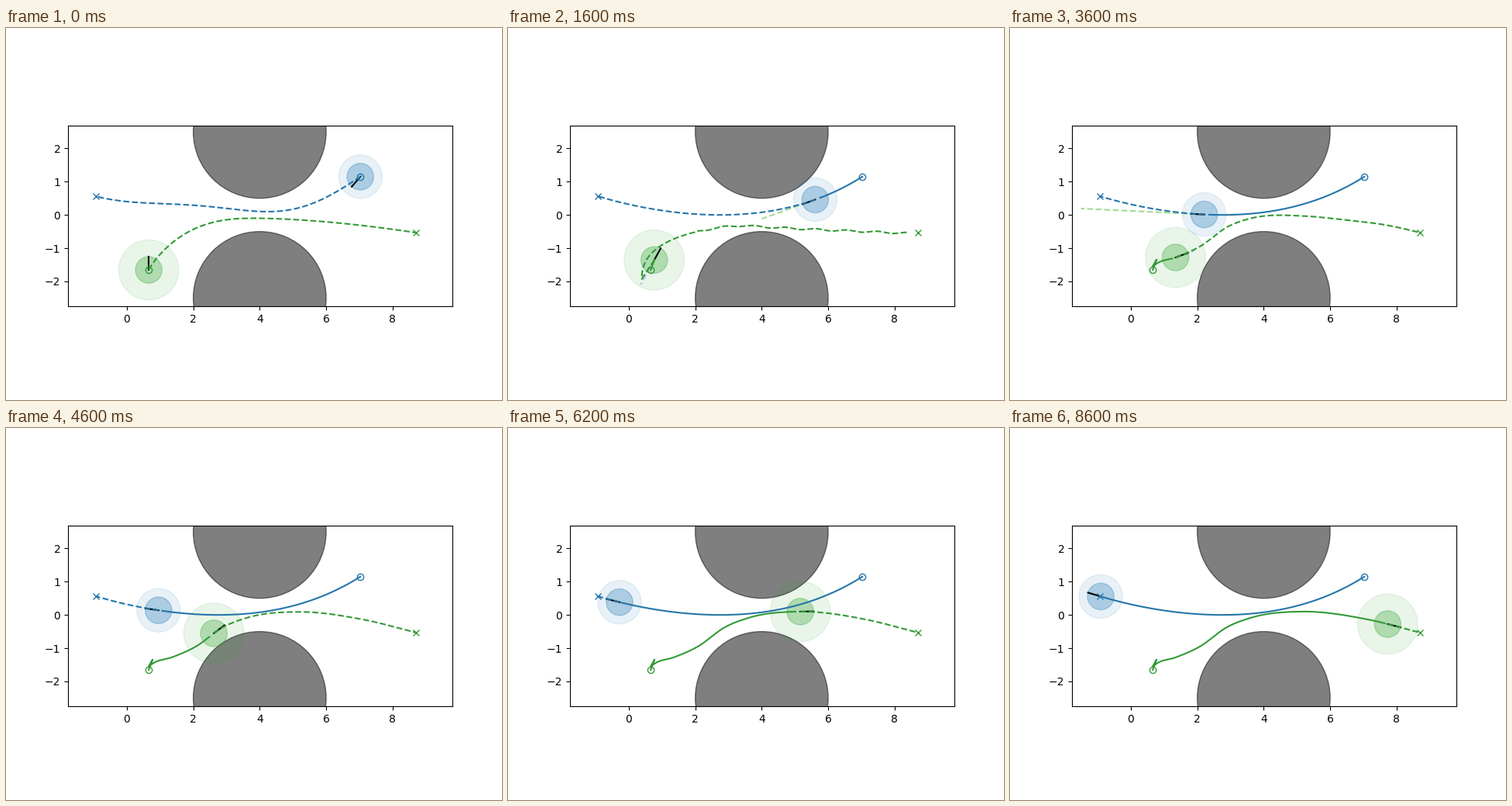
Animation of 640x480 px, one loop 8.7 s. Source, as a matplotlib script:

```python
import numpy as np
import matplotlib.pyplot as plt
from matplotlib.animation import FuncAnimation
from matplotlib.patches import Circle

FRAMES, STEP = 87, 100
BLUE, GREEN = "#2575a9", "#339a37"
PALE_BLUE, PALE_GREEN = "#aec7e8", "#a6da95"
BLUE_GOAL, GREEN_GOAL = (-0.925, 0.56), (8.71, -0.535)
BACK, GO, PASSED = 1.6, 2.4, 4.0      # seconds: reversing, setting off, passing


def smooth(keys, values, t):
    """Cubic Hermite interpolation through the keys."""
    k, v = np.asarray(keys, float), np.asarray(values, float)
    m = np.gradient(v, k)
    t = np.clip(t, k[0], k[-1])
    i = np.clip(np.searchsorted(k, t, side="right") - 1, 0, len(k) - 2)
    h = k[i + 1] - k[i]
    u = (t - k[i]) / h
    return ((2 * u**3 - 3 * u**2 + 1) * v[i] + (u**3 - 2 * u**2 + u) * h * m[i]
            + (3 * u**2 - 2 * u**3) * v[i + 1] + (u**3 - u**2) * h * m[i + 1])


def tangent(path, x, way):
    """Driving direction in degrees along path, way is +1 or -1."""
    dy = path(x + 0.02) - path(x - 0.02)
    return np.degrees(np.arctan2(way * dy, way * 0.04))


# blue agent: crosses from right to left
def blue_path(x):
    u = x - 2.75
    return u**2 * (0.0467 + 0.0025 * u + 0.0003 * u**2)


def blue_pos(t):
    x = smooth([0, 0.8, 1.6, 2.4, 3.6, 4.6, 6.2, 8.6],
               [7.03, 6.58, 5.61, 4.19, 2.21, 0.955, -0.28, -0.905], t)
    return np.array([x, blue_path(x)])


def blue_plan(t):
    x = np.linspace(blue_pos(t)[0], BLUE_GOAL[0], 240)
    v = np.clip((x - BLUE_GOAL[0]) / 7.955, 0, 1)
    detour = (0.41 - 0.37 * v) * np.sin(2 * np.pi * v**1.54)
    return x, blue_path(x) + max(0, 1 - t / 0.8) * detour


def blue_turn(t):
    return tangent(blue_path, blue_pos(t)[0], -1) + 17 * np.exp(-3 * t)


def blue_ahead(t):
    return 0.415 * t**3


# green agent: edges forward, backs off, then crosses from left to right
def green_path(x):
    return smooth([0.66, 0.8, 1.345, 2.08, 2.9, 3.6, 5.16, 7.1, 8.71],
                  [-1.545, -1.45, -1.28, -0.95, -0.365, -0.09, 0.1, -0.13,
                   -0.535], x)


def green_pos(t):
    e = np.clip(t / GO, 0, 1)
    nudge = np.sin(np.pi * e**1.3) ** 2
    x = smooth([2.4, 3.0, 3.6, 4.6, 6.2, 7.4, 8.6],
               [0.66, 0.83, 1.345, 2.62, 5.16, 6.67, 7.73], t)
    early = 0.66 + 0.115 * nudge, -1.655 + 0.11 * e + 0.245 * nudge
    return np.where(t < GO, early, (x, green_path(x)))


def arch(v, x0, y0, xt, yt, xe, ye, q, p, r):
    """Steep rise from (x0, y0) to a top, then a slow fall to (xe, ye)."""
    x = x0 + (xe - x0) * v
    s = np.clip((x - x0) / (xt - x0), 0, 1)
    u = np.clip((x - xt) / (xe - xt), 0, 1)
    return x, yt + (y0 - yt) * (1 - s**q) ** p + (ye - yt) * u**r


FIRST = np.array([0.66, -1.655, 3.85, -0.1, 8.71, -0.535, 0.9, 2.5, 1.7])
RETRY = np.array([0.39, -1.93, 3.5, -0.32, 8.37, -0.55, 0.45, 1.55, 0.8])


def green_plan(t):
    v = np.linspace(0, 1, 240) ** 2
    pos = green_pos(t)
    x = pos[0] + (GREEN_GOAL[0] - pos[0]) * v
    sag = 0.43 * np.clip((4.8 - t) / 2.4, 0, 1) ** 1.5
    bump = np.sin(np.pi * np.clip((x - 3) / 5.71, 0, 1)) ** 2
    y = green_path(x) - sag * bump
    if t >= GO:
        return x, y
    w = min(t / BACK, 1)
    ax_, ay = arch(v, *(FIRST + w * (RETRY - FIRST)))
    ay = ay - 0.025 * w * np.cos(2 * np.pi * (ax_ - 4.25) / 0.92) * (ax_ > 2)
    k = np.clip((t - BACK) / (GO - BACK), 0, 1)
    return (np.r_[pos[0], (1 - k) * ax_ + k * x],
            np.r_[pos[1], (1 - k) * ay + k * y])


def green_turn(t):
    k = np.clip((t - GO) / 0.8, 0, 1)
    start = 90 - 18 * min(t, GO)
    return (1 - k) * start + k * tangent(green_path, green_pos(t)[0], 1)


def green_ahead(t):
    return -0.85 * min(1, t) * np.sin(np.pi * (t - 0.8) / 1.6)


def ray(pos, degrees, length):
    a = np.radians(degrees)
    return np.column_stack([pos, pos + length * np.array([np.cos(a), np.sin(a)])])


fig, ax = plt.subplots(figsize=(6.4, 4.8), dpi=100)
ax.set_aspect("equal")
ax.set_xlim(-1.7705, 9.7995)
ax.set_ylim(-2.7433, 2.6867)
for y in (2.5, -2.5):
    ax.add_patch(Circle((4, y), 2, color="k", alpha=0.5))


class Agent:
    def __init__(self, color, fill, pale, reach, goal, pos, plan, turn, ahead):
        self.pos, self.plan, self.turn, self.ahead = pos, plan, turn, ahead
        self.discs = [Circle((0, 0), r, color=fill, alpha=a)
                      for r, a in ((reach, 0.1), (0.4, 0.3))]
        for d in self.discs:
            ax.add_patch(d)
        self.guess, = ax.plot([], [], "--", color=pale)
        self.nose, = ax.plot([], [], color="k")
        self.future, = ax.plot([], [], "--", color=color)
        self.trail, = ax.plot([], [], color=color)
        ax.plot(*pos(0.0), "o", color=color, fillstyle="none")
        ax.plot(*goal, "x", color=color)

    def update(self, t):
        pos, angle = self.pos(t), self.turn(t)
        for d in self.discs:
            d.center = tuple(pos)
        self.nose.set_data(*ray(pos, angle, 0.4))
        self.future.set_data(*self.plan(t))
        # the trail stays one step behind
        past = np.linspace(0, max(0, t - STEP / 1000), int(t * 40) + 2)
        self.trail.set_data(*self.pos(past))
        line = ray(pos, angle, self.ahead(t) if t < PASSED else 0)
        if line[0, 1] < -1.5:
            k = (-1.5 - pos[0]) / (line[0, 1] - pos[0])
            line[:, 1] = pos + k * (line[:, 1] - pos)
        self.guess.set_data(*line)


agents = [
    Agent(BLUE, "tab:blue", PALE_GREEN, 0.655, BLUE_GOAL,
          blue_pos, blue_plan, blue_turn, blue_ahead),
    Agent(GREEN, "tab:green", PALE_BLUE, 0.905, GREEN_GOAL,
          green_pos, green_plan, green_turn, green_ahead),
]


def draw(i):
    for agent in agents:
        agent.update(i * STEP / 1000)
    return []


anim = FuncAnimation(fig, draw, frames=FRAMES, interval=STEP, repeat=True,
                     repeat_delay=0, init_func=lambda: draw(0))
plt.show()
```
